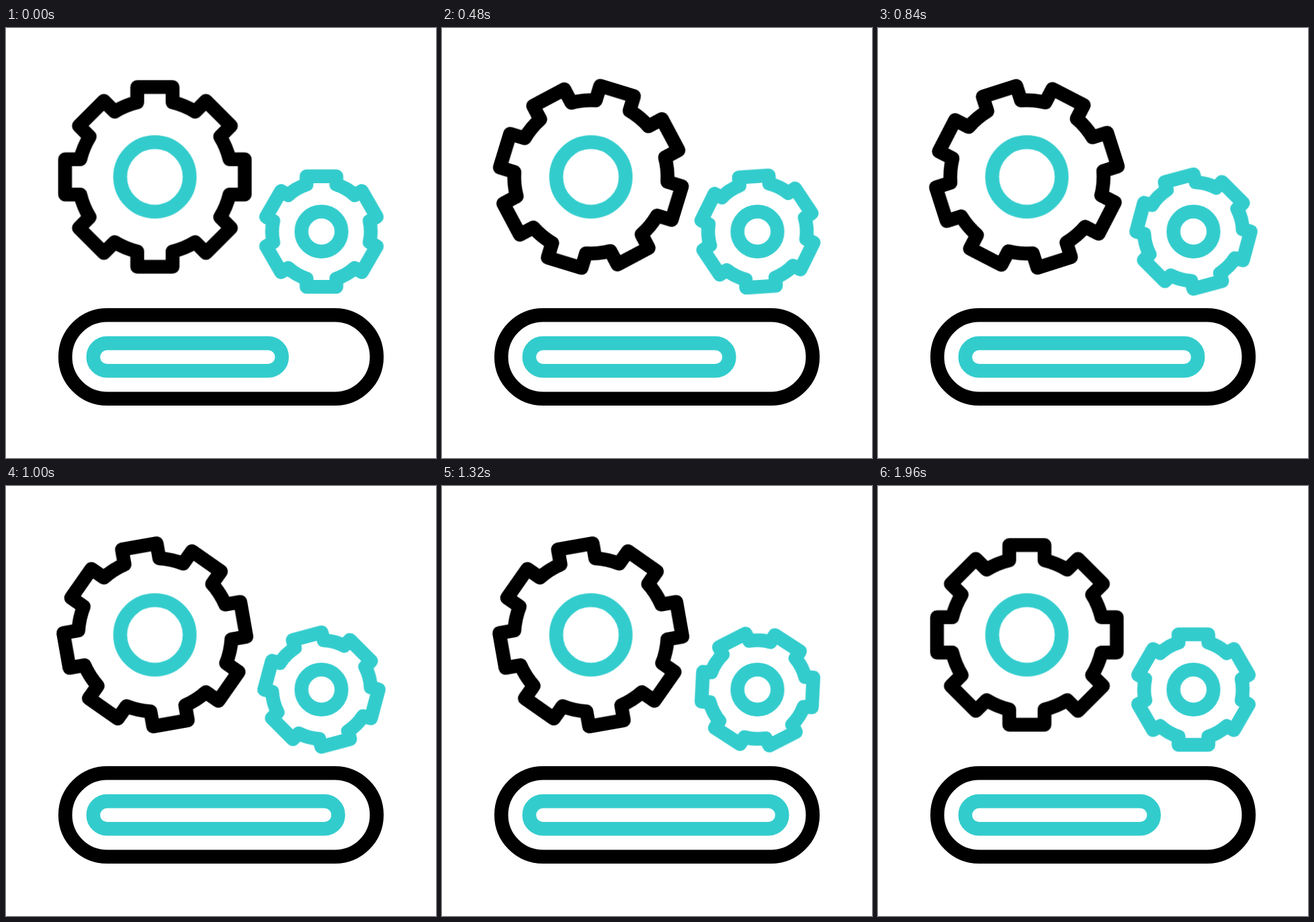
An HTML page that plays this animation: 640 px wide and 640 px high, repeating every 2000 ms.

```html
<!DOCTYPE html>
<html lang="en">
<head>
<meta charset="utf-8">
<title>Gears and progress bar</title>
<style>
  html, body { margin: 0; width: 100%; height: 100%; overflow: hidden; background: #fff; }
  svg { display: block; width: 100vw; height: 100vh; }
  .ink { stroke: #000; }
  .teal { stroke: #33cccd; }
  #big { animation: big 2s infinite; }
  #small { animation: small 2s infinite; }
  #fill { width: 280.9px; animation: fill 2s infinite; }

  @keyframes big {
    0% { transform: rotate(0deg); }
    4% { transform: rotate(0deg); animation-timing-function: cubic-bezier(.66, 0, .64, 1); }
    50% { transform: rotate(80deg); }
    67% { transform: rotate(80deg); animation-timing-function: cubic-bezier(.5, 0, .5, 1); }
    82%, 100% { transform: rotate(90deg); }
  }
  @keyframes small {
    0% { transform: rotate(0deg); }
    15% { transform: rotate(0deg); animation-timing-function: cubic-bezier(.55, 0, .45, 1); }
    39% { transform: rotate(-15deg); }
    50% { transform: rotate(-15deg); animation-timing-function: cubic-bezier(.55, 0, .22, 1); }
    98%, 100% { transform: rotate(-60deg); }
  }
  @keyframes fill {
    0% { width: 280.9px; }
    4% { width: 280.9px; animation-timing-function: cubic-bezier(.52, 0, .55, 1); }
    65% { width: 376.5px; }
    68% { width: 376.5px; animation-timing-function: cubic-bezier(.6, 0, .52, 1); }
    98%, 100% { width: 280.9px; }
  }
</style>
</head>
<body>
<svg viewBox="0 0 640 640" fill="none" stroke-width="20.6" stroke-linejoin="round">
  <g transform="translate(221.6 221.6)">
    <path id="big" class="ink"/>
    <circle class="teal" r="51.7"/>
  </g>
  <g transform="translate(469.5 303)">
    <path id="small" class="teal"/>
    <circle class="teal" r="29.8"/>
  </g>
  <rect class="ink" x="88.2" y="427.2" width="463.6" height="124.6" rx="62.3"/>
  <rect id="fill" class="teal" x="129.8" y="469.1" height="41.2" rx="20.6"/>
</svg>
<script>
  // Outline of a gear: straight teeth joined by arcs around the centre.
  function gearPath(teeth, half, root, tip) {
    const radius = Math.hypot(half, root);
    let d = "";
    for (let i = 0; i < teeth; i++) {
      const a = i * 2 * Math.PI / teeth;
      const at = (x, y) =>
        (x * Math.cos(a) - y * Math.sin(a)).toFixed(2) + " " +
        (x * Math.sin(a) + y * Math.cos(a)).toFixed(2);
      const start = at(-half, -root);
      d += i ? `A${radius} ${radius} 0 0 1 ${start}` : `M${start}`;
      d += `L${at(-half, -tip)}L${at(half, -tip)}L${at(half, -root)}`;
    }
    return d + `A${radius} ${radius} 0 0 1 ${-half} ${-root}Z`;
  }
  document.getElementById("big").setAttribute("d", gearPath(8, 26.3, 111, 133.7));
  document.getElementById("small").setAttribute("d", gearPath(6, 22.2, 70, 82.2));
</script>
</body>
</html>
```
